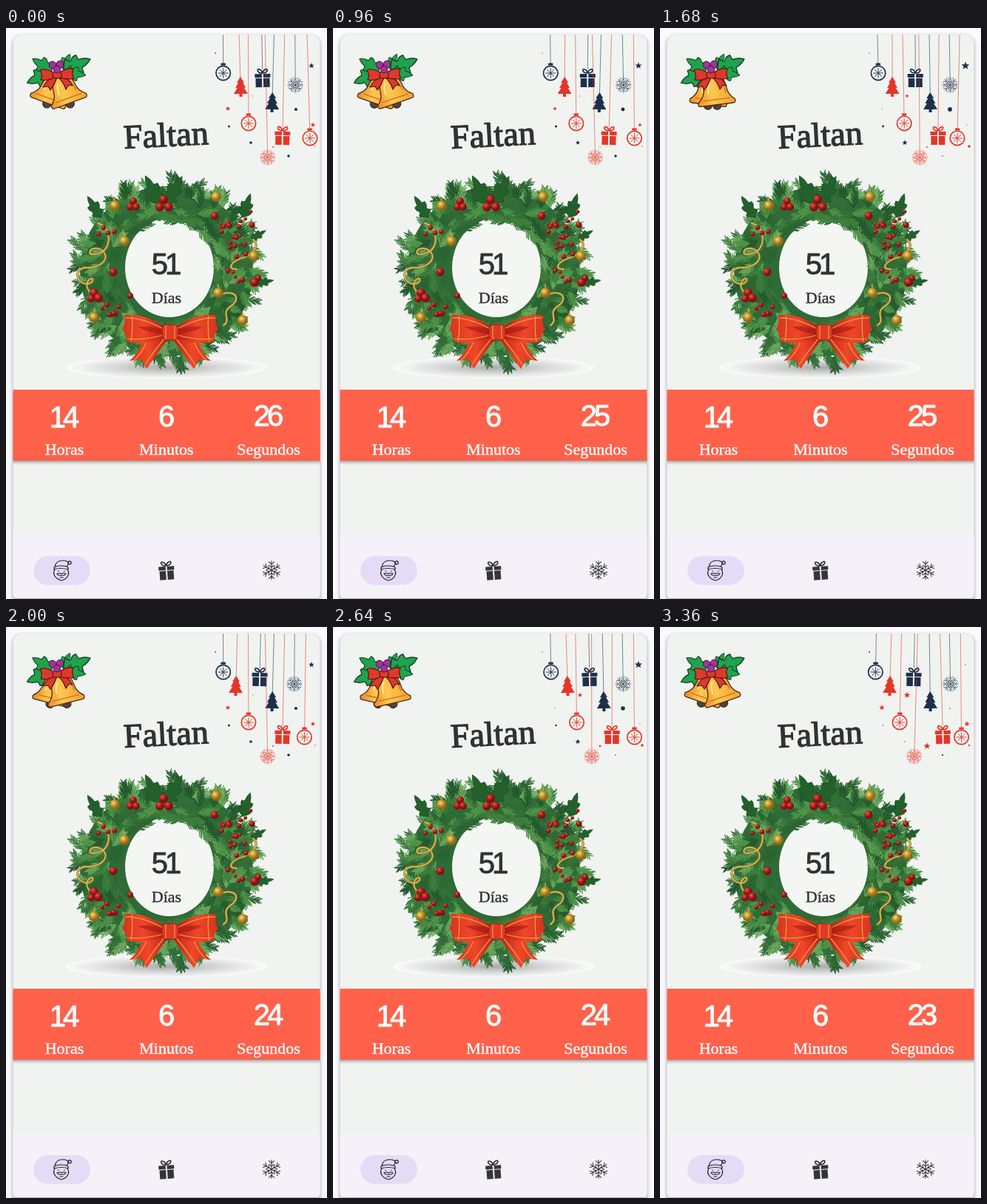
These frames come from a looping animation (434 px wide and 772 px high, 3440 ms). An HTML page:

```html
<!DOCTYPE html>
<html lang="es">
<head>
<meta charset="utf-8">
<style>
  html, body { margin: 0; width: 100%; height: 100%; overflow: hidden; background: #faf9fd; }
  svg { display: block; width: 434px; height: 772px; }
  text { text-anchor: middle; font-family: "Liberation Serif", serif; }
  .num { font: 40px "Liberation Sans", sans-serif; letter-spacing: -4px; stroke-width: .9; stroke-linejoin: round; }
  .label { font-size: 22px; stroke-width: .4; }
  .dark { fill: #303234; stroke: #303234; }
  .light { fill: #fff; stroke: #fff; }
  .line { fill: none; stroke: currentColor; stroke-linecap: round; stroke-linejoin: round; }
</style>
</head>
<body>
<svg viewBox="0 0 434 772">
  <defs>
    <clipPath id="card"><rect x="9.500" y="9" width="415" height="768" rx="13"/></clipPath>
    <filter id="soft" x="-10%" y="-10%" width="120%" height="120%"><feGaussianBlur stdDeviation="2"/></filter>
    <filter id="fuzz"><feGaussianBlur stdDeviation=".55"/></filter>
    <radialGradient id="ground">
      <stop offset="0" stop-color="#a9abaa"/><stop offset=".55" stop-color="#d9dbda"/>
      <stop offset=".88" stop-color="#f1f2f1"/><stop offset="1" stop-color="#fcfcfc"/>
    </radialGradient>
    <radialGradient id="berry" cx=".35" cy=".3">
      <stop offset="0" stop-color="#e8604c"/><stop offset=".45" stop-color="#c02722"/><stop offset="1" stop-color="#7d1214"/>
    </radialGradient>
    <radialGradient id="gold" cx=".38" cy=".35">
      <stop offset="0" stop-color="#f7e08a"/><stop offset=".45" stop-color="#cfa030"/><stop offset="1" stop-color="#8d6a1c"/>
    </radialGradient>
    <linearGradient id="satin" x2="1">
      <stop offset="0" stop-color="#d8321d"/><stop offset=".5" stop-color="#f0472a"/><stop offset="1" stop-color="#b81d14"/>
    </linearGradient>
    <linearGradient id="brass" x2="1">
      <stop offset="0" stop-color="#f08a28"/><stop offset=".4" stop-color="#fcc850"/><stop offset="1" stop-color="#f3a12f"/>
    </linearGradient>

    <path id="leaf" d="M0 0Q-7-3-10-6Q-6-8-6-10Q-10-13-9-17Q-5-17-4-18Q-4-23 0-28Q4-23 4-18Q5-17 9-17Q10-13 6-10Q6-8 10-6Q7-3 0 0Z"/>
    <g id="ball" class="line">
      <circle r="9.700" stroke-width="1.700"/>
      <path d="M0-6.500V6.500M-6.500 0H6.500M-4.600-4.600 4.600 4.600M-4.600 4.600 4.600-4.600" stroke-width=".9"/>
      <path d="M-2-12H2" stroke-width="3"/>
    </g>
    <path id="tree" fill="currentColor" d="M0-14 5-6H3L7 1H4.500L9.500 9H2V13H-2V9H-9.500L-4.500 1H-7L-3-6H-5Z"/>
    <g id="gift">
      <path fill="currentColor" d="M-10.500-6H-1V-1H-10.500ZM1-6H10.500V-1H1ZM-9.500 0H-1V12H-9.500ZM1 0H9.500V12H1Z"/>
      <path class="line" stroke-width="1.700" d="M0-7C-8-7-8-14-4-12Q-1-11 0-7C8-7 8-14 4-12Q1-11 0-7"/>
    </g>
    <path id="spoke" class="line" d="M0 0V-10.500M-3-9.500 0-6.500 3-9.500M-2.500-5.500 0-3 2.500-5.500"/>
    <path id="star" fill="currentColor" d="M0-5 1.300-1.700 4.800-1.500 2.100 .7 3 4 0 2.200-3 4-2.100 .7-4.800-1.500-1.300-1.700Z"/>
    <g id="bell" stroke="#4a2a1c" stroke-width="1.300" stroke-linejoin="round">
      <circle cy="43" r="5.500" fill="#4b4544"/>
      <path fill="url(#brass)" d="M0 4C14 4 15 14 16 24Q18 32 25 37Q26 42 22 42H-22Q-26 42-25 37Q-18 32-16 24C-15 14-14 4 0 4Z"/>
      <path fill="none" stroke="#c9701f" d="M-18 35H19M8 10Q13 18 14 28"/>
      <path fill="none" stroke="#ffe9a0" stroke-width="2" d="M-6 11Q-10 17-10 27"/>
    </g>
    <g id="halfBow">
      <path fill="url(#satin)" d="M212 414 184 424Q178 441 167 450L183 448 190 461Q205 440 219 420Z"/>
      <path fill="none" stroke="#e6a444" stroke-width="1.200" d="M190 424Q184 440 173 449M214 420Q200 437 188 455"/>
      <path fill="url(#satin)" d="M214 404C195 390 173 385 159 389Q163 398 157 407Q164 416 163 424C180 428 202 425 214 418Z"/>
      <path fill="#a51a14" opacity=".6" d="M214 407Q192 402 178 404Q192 412 214 414Z"/>
      <path fill="none" stroke="#e6a444" stroke-width="1.200" d="M161 392C179 391 198 399 213 407M164 420C180 422 200 419 213 415M170 389Q172 405 169 424"/>
    </g>
  </defs>

  <rect x="8.500" y="10" width="417" height="775" rx="13" fill="#9c9ca4" opacity=".7" filter="url(#soft)"/>
  <g clip-path="url(#card)">
    <rect width="434" height="780" fill="#f0f3f0"/>
    <g id="sky"></g>
    <rect y="685" width="434" height="95" fill="#f4f2f8"/>
    <rect x="4" y="496" width="426" height="91" fill="#777" opacity=".75" filter="url(#soft)"/>
    <rect y="489" width="434" height="96" fill="#ff614b"/>
    <path d="M9 771.500H425" stroke="#a9a8ae"/>
  </g>

  <g id="bells">
    <g id="holly" fill="#1fa34c" stroke="#133d24" stroke-width="1"></g>
    <use id="bellLeft" href="#bell"/>
    <use id="bellRight" href="#bell"/>
    <g fill="#dc3a2c" stroke="#501515" stroke-width="1.200" stroke-linejoin="round">
      <path d="M65 65Q55 70 50 80L57 79 60 84Q66 76 69 66ZM70 66Q78 73 81 83L85 77 90 78Q86 69 74 64Z"/>
      <path d="M67 62Q53 53 46 57Q50 64 47 70Q57 72 67 66ZM70 62Q83 52 91 56Q88 62 92 68Q82 71 70 66Z"/>
      <rect x="63" y="59" width="12" height="9" rx="4"/>
    </g>
    <g fill="#a33596" stroke="#451447">
      <circle cx="63" cy="50" r="4.800"/><circle cx="73" cy="49" r="4.800"/><circle cx="69" cy="56" r="4.800"/>
    </g>
  </g>

  <ellipse cx="217" cy="459" rx="136" ry="15" fill="url(#ground)"/>
  <ellipse cx="221" cy="324" rx="66" ry="74" fill="#f4f6f4"/>
  <g id="needles" filter="url(#fuzz)"></g>
  <g id="trimmings"></g>
  <use href="#halfBow"/>
  <use href="#halfBow" transform="matrix(-1 0 0 1 444 0)"/>
  <rect x="211" y="401" width="22" height="21" rx="6" fill="#e13a22" stroke="#a51a14"/>
  <path d="M216 402V421M228 402V421" stroke="#e6a444" stroke-width="1.200"/>

  <text class="dark" transform="rotate(-3 217 159)" x="217" y="160" font-size="46" stroke-width="1.300">Faltan</text>
  <text class="num dark" x="215" y="333">51</text>
  <text class="label dark" x="217" y="372">Días</text>
  <text class="num light" x="77" y="540">14</text>
  <text class="num light" x="215" y="539">6</text>
  <text class="num light" x="353" y="538" id="seconds">26</text>
  <text class="label light" x="79" y="577">Horas</text>
  <text class="label light" x="217" y="577">Minutos</text>
  <text class="label light" x="355" y="577">Segundos</text>

  <rect x="37" y="714" width="77" height="39" rx="19.500" fill="#e4dcf7"/>
  <g transform="translate(75 733)" color="#25232a">
    <path class="line" stroke-width="1.200" d="M-9-4Q-8-13 2-13Q8-13 10-9M-10-4Q0-8 9-4V-1Q0-4-10-1ZM-9-1C-13 5-8 12 0 14C8 12 12 5 8-1M-6 5Q-3 3 0 5Q3 3 6 5Q4 8 0 7Q-4 8-6 5M-2 10H2M-4 1V1.500M4 1V1.500M7-5 9-8"/>
    <circle class="line" cx="11" cy="-10" r="2.200" stroke-width="1.200"/>
  </g>
  <use href="#gift" transform="translate(217 734) rotate(-4)" color="#353439"/>
  <g id="navFlake" transform="translate(359 733) scale(1.200)" color="#353439" stroke-width=".85"></g>
</svg>
<script>
const $ = id => document.getElementById(id);
const RED = '#e63527', NAVY = '#1d2f4b', LOOP = 3440, STEP = 80, TAU = Math.PI * 2;

function add(parent, tag, attrs) {
  const node = document.createElementNS('http://www.w3.org/2000/svg', tag);
  for (const key in attrs) node.setAttribute(key, attrs[key]);
  return parent.appendChild(node);
}
let seed = 11;
const random = (a = 0, b = 1) => {
  seed = (seed * 16807) % 2147483647;
  return a + (b - a) * seed / 2147483647;
};
const wave = (t, period, peak) => Math.cos(TAU * (t - peak) / period);

function flake(parent, spokes) {
  for (let i = 0; i < spokes; i++) add(parent, 'use', { href: '#spoke', transform: `rotate(${i * 360 / spokes})` });
}
flake($('navFlake'), 6);

// kind, x, y, colour, sway, period, time of rightmost point
const ornaments = [
  ['ball', 293.3, 61, NAVY, 2.2, 1, .78],
  ['tree', 314, 80, RED, 3.2, 4 / 3, .02],
  ['gift', 345, 68, NAVY, 2, 4 / 3, .04],
  ['flake', 390.5, 77, NAVY, 2.2, .8, .16],
  ['tree', 363.5, 101, NAVY, 3.6, 1, .52],
  ['ball', 327.3, 129, RED, 3.6, 1, .78],
  ['gift', 377.5, 146, RED, 5, 1, .38],
  ['ball', 406, 149, RED, 5, 1.2, 1.2],
  ['flake', 349.5, 175, RED, 5.8, 1, .88]
].map(([kind, x, y, color, sway, period, peak]) => {
  const node = add($('sky'), 'g', { color });
  const top = kind === 'flake' ? 10 : 12;
  add(node, 'path', { d: `M${x} -20V${y - top}`, stroke: color, 'stroke-width': .7, opacity: .8 });
  const shape = add(node, 'g', { transform: `translate(${x} ${y})`, 'stroke-width': .65 });
  if (kind === 'flake') flake(shape, 8);
  else add(shape, 'use', { href: '#' + kind });
  return { node, x, y, sway, period, peak };
});

// x, y, colour, largest scale, time of largest size, round
const sparkles = [
  [413, 51, NAVY, 1.1, .78], [331, 155, NAVY, .75, .78], [334, 92, RED, .9, .42],
  [361, 161, RED, .95, .34], [300, 109, RED, .85, .2], [415, 131, RED, .85, .2],
  [392, 110, NAVY, .8, .78, 1], [301.5, 133, NAVY, .45, .85, 1], [382, 173, NAVY, .5, .1, 1],
  [283, 34, RED, .35, .2, 1], [418, 160, RED, .5, .6, 1]
].map(([x, y, color, size, peak, round]) => ({
  x, y, size, peak,
  node: round ? add($('sky'), 'circle', { r: 3.6, fill: color }) : add($('sky'), 'use', { href: '#star', color })
}));

for (const [x, y, angle, size] of [[62, 60, -113, 1.3], [62, 58, -58, 1.1], [76, 55, 28, .8], [78, 58, 66, 1.4], [80, 60, 98, 1]])
  add($('holly'), 'use', { href: '#leaf', transform: `translate(${x} ${y}) rotate(${angle}) scale(${size})` });

function sprig(x, y, heading, length) {
  let d = `M${x} ${y}l${length * Math.cos(heading)} ${length * Math.sin(heading)}`;
  for (let s = 0; s <= length; s += 2.5) {
    const px = x + s * Math.cos(heading), py = y + s * Math.sin(heading);
    const needle = 10 - 4 * s / length;
    for (const side of [-.6, .6]) {
      const a = heading + side + random(-.15, .15);
      d += `M${px.toFixed(1)} ${py.toFixed(1)}l${(needle * Math.cos(a)).toFixed(1)} ${(needle * Math.sin(a)).toFixed(1)}`;
    }
  }
  const color = ['#2a6532', '#3c7f3c', '#4f9349', '#356f38', '#69a75c', '#24582d'][Math.floor(random(0, 6))];
  add($('needles'), 'path', { d, stroke: color, 'stroke-width': 1.25, 'stroke-linecap': 'round' });
}

function drawNeedles() {
  add($('needles'), 'path', {
    d: 'M100 329a117 115 0 1 0 234 0a117 115 0 1 0 -234 0ZM161 324a60 67 0 1 0 120 0a60 67 0 1 0 -120 0Z',
    fill: '#2f6b36', 'fill-rule': 'evenodd'
  });
  for (let i = 0; i < 300; i++) {
    const a = i * 2.39996, inner = i % 3 === 0, side = i % 2 ? 1 : -1;
    const r = inner ? random(70, 86) : random(84, 117);
    const heading = a + side * (inner ? random(1.4, 1.9) : random(.2, 1));
    sprig(217 + r * Math.cos(a), 329 + r * Math.sin(a), heading, random(17, 24));
  }
}

function drawTrimmings() {
  const root = $('trimmings');
  const holly = [[208, 237, -28, 1.5], [217, 237, 30, 1.5], [128, 256, -32, 1.2], [320, 256, 18, 1.2], [332, 285, 60, .8], [340, 345, 80, .8]];
  for (const [x, y, angle, size] of holly)
    add(root, 'use', { href: '#leaf', fill: '#24602c', stroke: '#174d25', 'stroke-width': .6, transform: `translate(${x} ${y}) rotate(${angle}) scale(${size * .75} ${size})` });

  for (const d of ['M124 264C142 268 144 298 127 304C106 312 112 293 127 299C143 308 132 325 107 324C92 326 94 344 108 346C121 347 119 332 111 342C106 351 113 358 120 360',
    'M334 286C345 295 332 306 322 310C302 316 299 327 312 326M291 360C311 353 318 367 304 376C289 386 306 394 294 402'])
    for (const [stroke, width] of [['#8c6a23', 3], ['#d9b858', 1.8]])
      add(root, 'path', { d, fill: 'none', stroke, 'stroke-width': width, 'stroke-linecap': 'round' });

  const dot = (x, y, r, fill) => add(root, 'circle', { cx: x, cy: y, r, fill: `url(#${fill})` });
  for (const [x, y] of [[147, 240], [284, 228], [160, 288], [335, 308], [287, 358], [119, 391], [320, 395]]) {
    add(root, 'path', { d: `M${x} ${y - 12}v6`, stroke: '#c9a544', 'stroke-width': 1.6 });
    dot(x, y, 7, 'gold');
  }
  for (const [x, y, r] of [[213, 232, 6], [208, 242, 6], [220, 242, 6], [172, 234, 5], [168, 242, 5], [176, 242, 5],
    [119, 358, 6], [125, 365, 6], [115, 366, 5], [145, 330, 5.5], [282, 254, 5.5], [336, 344, 6], [341, 338, 4], [168, 362, 4]])
    dot(x, y, r, 'berry');
  for (const [x, y, count] of [[305, 272, 11], [315, 300, 7], [310, 341, 5], [143, 384, 7], [139, 273, 4], [320, 258, 4]])
    for (let i = 0; i < count; i++) dot(x + random(-14, 14), y + random(-13, 13), random(2.4, 3.7), 'berry');
}
drawNeedles();
drawTrimmings();

function draw(t) {
  for (const o of ornaments) {
    const angle = -o.sway * wave(t, o.period, o.peak) / (o.y + 30) * 360 / TAU;
    o.node.setAttribute('transform', `rotate(${angle} ${o.x} -30)`);
  }
  for (const s of sparkles) {
    const scale = s.size * Math.min(1, .62 + .55 * wave(t, 1, s.peak));
    s.node.setAttribute('transform', `translate(${s.x} ${s.y}) scale(${Math.max(.2, scale)})`);
  }
  const spread = 14 + 7 * wave(t, 1.2, 1.1);
  $('bellLeft').setAttribute('transform', `translate(70 62) rotate(${spread})`);
  $('bellRight').setAttribute('transform', `translate(72 62) rotate(${-spread})`);
  $('seconds').textContent = 26 - Math.floor(t + .1);
}

function tick() {
  const now = performance.now() % LOOP;
  draw(Math.floor(now / STEP) * STEP / 1000);
  requestAnimationFrame(tick);
}
tick();
</script>
</body>
</html>
```
